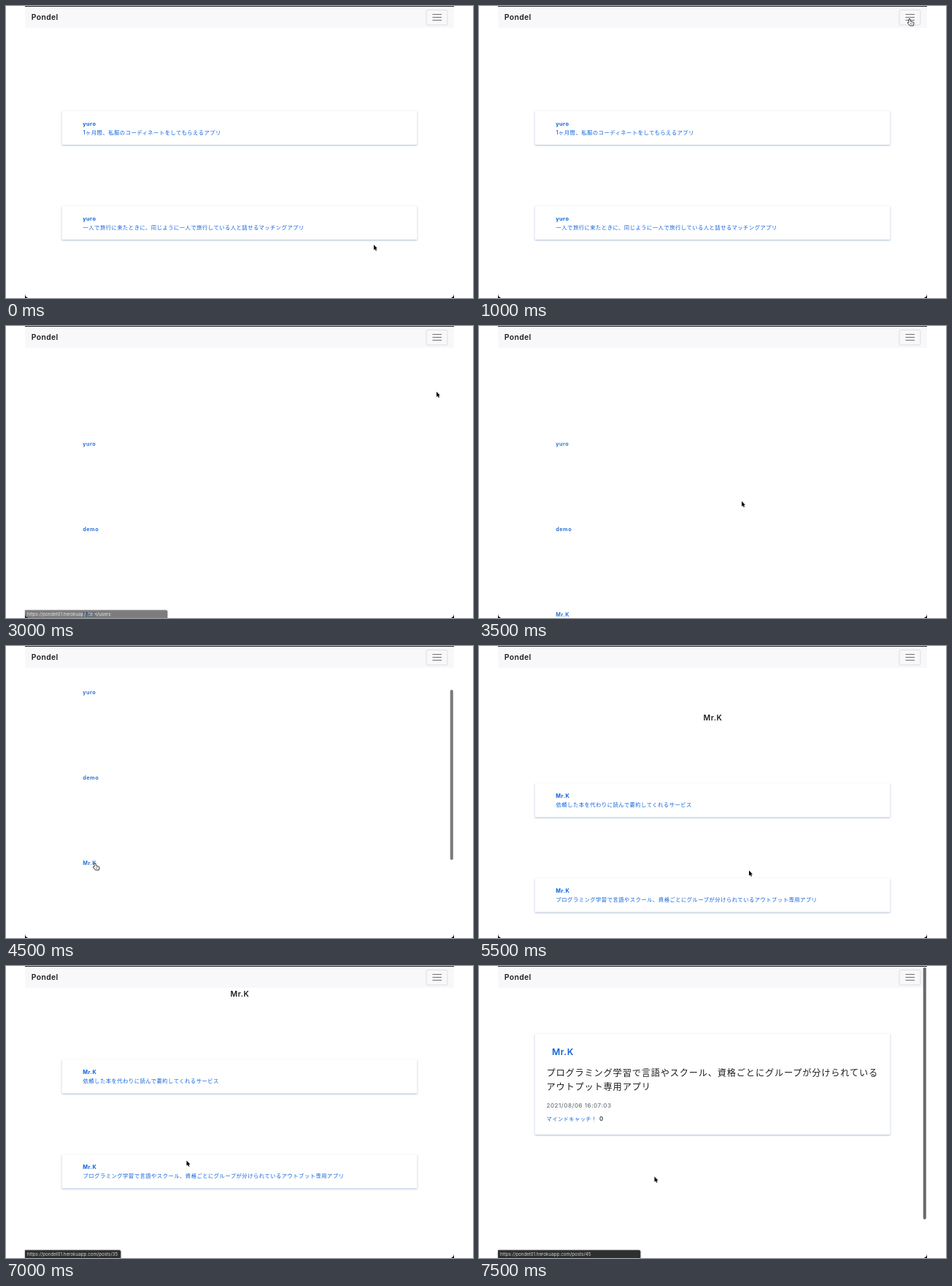
Recreate the animation shown at these times as an HTML page. Size 640 by 400 pixels, loop 8 s.

```html
<!DOCTYPE html>
<html lang="ja">
<head>
<meta charset="utf-8">
<title>Pondel</title>
<style>
html, body { margin: 0; width: 100%; height: 100%; overflow: hidden; background: #fff; }
svg { display: block; width: 640px; height: 400px; }
text { font-family: Inter, "Noto Sans CJK JP", "Noto Sans CJK", sans-serif; white-space: pre; }
.card { fill: #fff; filter: drop-shadow(0 1px 1.2px rgba(50, 95, 150, .42)); }
</style>
</head>
<body>
<svg id="stage" viewBox="0 0 640 400"></svg>
<script>
const stage = document.getElementById('stage');
const STEP = 500, LOOP = 8000;
const BLUE = '#0d62dc', INK = '#1b1c1f';
const HOST = 'https://pondel01.herokuapp.com/';

const rect = (x, y, w, h, fill, more = '') =>
  `<rect x="${x}" y="${y}" width="${w}" height="${h}" fill="${fill}" ${more}/>`;

const text = (x, y, str, { size = 7.3, weight = 500, fill = BLUE, gap = .5, anchor = 'start' } = {}) =>
  `<text x="${x}" y="${y}" fill="${fill}" text-anchor="${anchor}" ` +
  `style="font-size:${size}px;font-weight:${weight};letter-spacing:${gap}px">${str}</text>`;

const panel = (y, h) => `<rect class="card" x="76.5" y="${y}" width="487" height="${h}" rx="1"/>`;

const post = (y, name, idea) =>
  panel(y, 46.5) + text(105.2, y + 20.4, name, { weight: 700 }) + text(105.5, y + 32.3, idea);

const LONG_IDEA = ['プログラミング学習で言語やスクール、資格ごとにグループが分けられている', 'アウトプット専用アプリ'];

const pages = {
  ideas: () =>
    post(143.5, 'yuro', '1ヶ月間、私服のコーディネートをしてもらえるアプリ') +
    post(273.5, 'yuro', '一人で旅行に来たときに、同じように一人で旅行している人と話せるマッチングアプリ'),
  users: () => ['yuro', 'demo', 'Mr.K']
    .map((name, i) => text(105.2, 163.9 + i * 117, name, { weight: 600, fill: '#1666d0' })).join(''),
  profile: () =>
    text(320.5, 101.8, 'Mr.K', { size: 10.5, weight: 600, fill: INK, anchor: 'middle' }) +
    post(188, 'Mr.K', '依頼した本を代わりに読んで要約してくれるサービス') +
    post(318, 'Mr.K', LONG_IDEA.join('')),
  detail: () =>
    panel(92.5, 138.5) +
    text(100, 122, 'Mr.K', { size: 12.2, weight: 600 }) +
    LONG_IDEA.map((line, i) => text(92.5, 150.5 + i * 19, line, { size: 12.2, gap: .83, fill: INK })).join('') +
    text(92.5, 194, '2021/08/06 16:07:03', { size: 8, fill: '#6c757d' }) +
    text(92.5, 211.8, 'マインドキャッチ！', { size: 7.2, gap: .5 }) +
    text(165, 212, '0', { size: 8, fill: INK })
};

function navbar(menu, focus, hover) {
  let out = rect(26, 0, 588, menu ? 127 : 30, '#f8f8fa') +
    text(34.7, 19, 'Pondel', { size: 10.3, weight: 600, fill: '#18191b', gap: .45 }) +
    rect(576, 5.5, 29, 20.5, 'none', focus
      ? 'rx="2" stroke="#3c72cf" stroke-width="1.6"'
      : 'rx="2" stroke="#dddde1"');
  for (const y of [11, 15, 19]) out += rect(584.5, y, 12.5, 1, '#717174');
  if (menu) {
    ['yuro', 'マインド一覧', 'マインドセット', 'ユーザー一覧', 'ログアウト'].forEach((item, i) => {
      out += text(605.5, 38.2 + i * 19.3, item, { fill: i === hover ? '#35363a' : '#77787b', anchor: 'end' });
    });
  }
  return out;
}

function statusBar({ path, width = 195, fade = 1 }) {
  return `<g opacity="${fade}"><path d="M26 400V389.2H${24.3 + width}q2 0 2 2V400z" fill="#2e2f31" ` +
    `style="filter:drop-shadow(0 0 1px rgba(0,0,0,.4))"/>` +
    text(29, 397, HOST + path, { size: 6.25, weight: 400, gap: 0, fill: '#d2d2d2' }) + '</g>';
}

const scrollbar = ([y, h, fill]) => rect(608.7, y, 4.1, h, fill, 'rx="2"');

function cursor(x, y, hand) {
  const shape = hand
    ? '<path d="M-1 1q1-1.6 2 0l.5 3.2 3.3.8q1.6.5 1.2 2L5.2 10H.6L-2.6 6.3q-.4-1.5 1.6-.8z" fill="#fff" stroke="#222" stroke-width=".9"/><path d="M1.5 6v2.5M3.2 6v2.5" stroke="#222" stroke-width=".5"/>'
    : '<path d="M0 0V7.2L1.6 5.7 2.8 8.3 4 7.8 2.9 5.2H5z" fill="#000" stroke="#fff" stroke-width=".8" paint-order="stroke"/>';
  return `<g transform="translate(${x} ${y})">${shape}</g>`;
}

const arrow = (x, y) => ({ at: [x, y, false] });
const hand = (x, y) => ({ at: [x, y, true] });
const ideas = { page: 'ideas' }, users = { page: 'users' }, profile = { page: 'profile' };
const open = { ...ideas, menu: true, focus: true };

// One browser state per half second
const steps = [
  { ...ideas, ...arrow(504, 327) },
  { ...ideas, ...arrow(598, 64) },
  { ...ideas, ...hand(590, 17) },
  { ...open, ...hand(590, 17) },
  { ...open, hover: 1, ...hand(590, 58) },
  { ...open, focus: false, hover: 3, status: { path: 'users' }, ...hand(590, 91) },
  { ...users, status: { path: 'users', fade: .62 }, ...arrow(590, 90) },
  { ...users, ...arrow(360, 240) },
  { ...users, scroll: 63, bar: [39, 233, '#7b7b7b'], ...arrow(150, 310) },
  { ...users, scroll: 98, bar: [60, 233, '#7b7b7b'], ...hand(122, 297) },
  { ...profile, status: { path: 'users/3' }, bar: [2, 345, '#6a6a6a'], ...arrow(122, 297) },
  { ...profile, ...arrow(370, 307.5) },
  { ...profile, scroll: 60, bar: [53, 345, '#7b7b7b'], ...arrow(370, 307.5) },
  { ...profile, scroll: 60, ...arrow(330, 290) },
  { ...profile, scroll: 60, status: { path: 'posts/35', width: 131 }, ...arrow(247.5, 266.5) },
  { page: 'detail', status: { path: 'posts/45' }, bar: [2, 345, '#6a6a6a'], ...arrow(240.5, 288.5) }
];

function render(s) {
  stage.innerHTML =
    rect(0, 0, 640, 400, '#fff') +
    `<g transform="translate(0 ${-(s.scroll || 0)})">${pages[s.page]()}</g>` +
    navbar(s.menu, s.focus, s.hover) +
    rect(26, 0, 588, 1, '#2b2b2f') +
    '<path d="M26 394.5Q26.5 399 30.5 400H26zM614 394.5Q613.5 399 609.5 400H614z" fill="#000"/>' +
    (s.bar ? scrollbar(s.bar) : '') +
    (s.status ? statusBar(s.status) : '') +
    cursor(...s.at);
}

let shown = -1;
function tick(now) {
  const index = Math.floor((now % LOOP) / STEP);
  if (index !== shown) render(steps[shown = index]);
  requestAnimationFrame(tick);
}
tick(performance.now());
</script>
</body>
</html>
```
